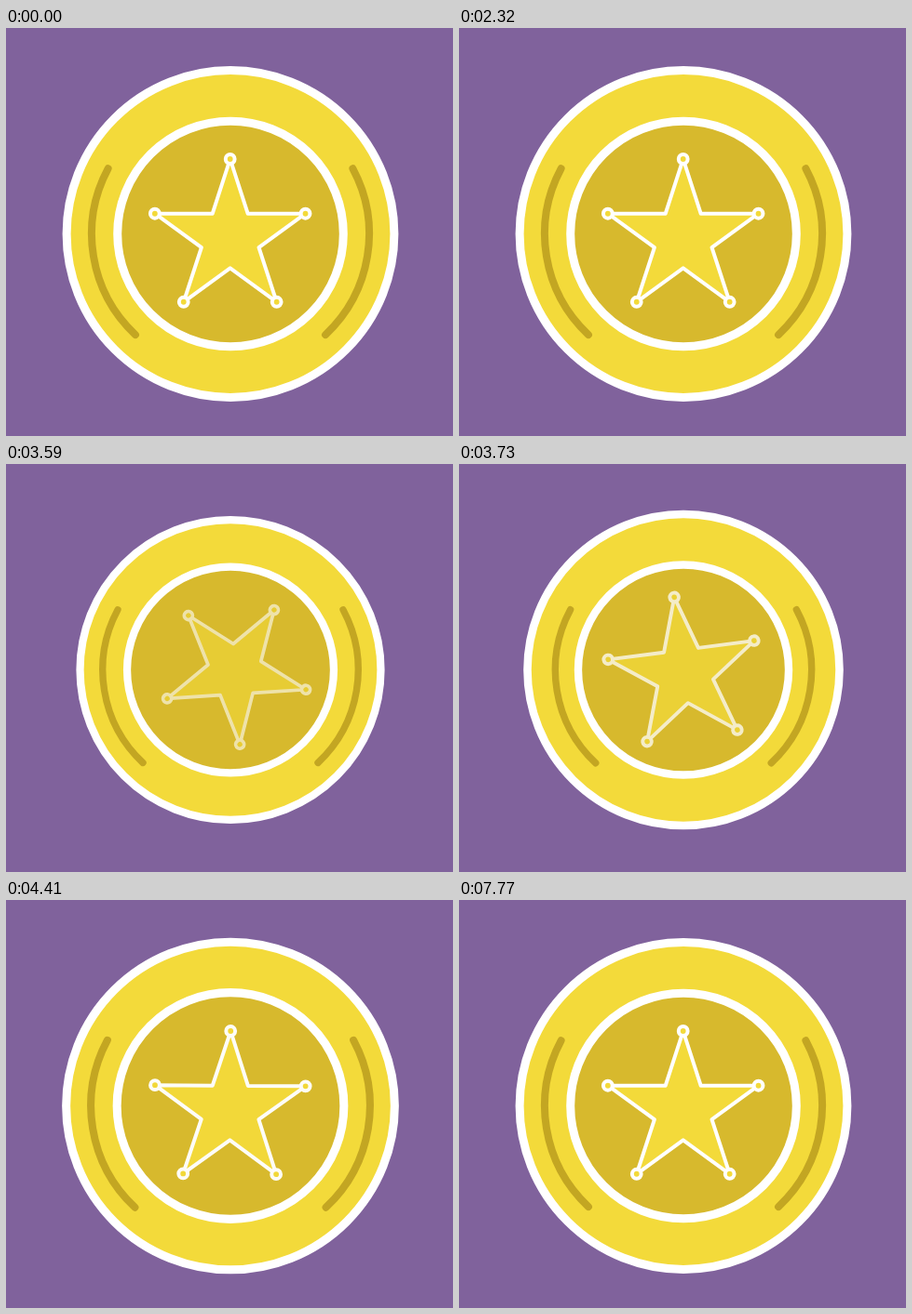
Animation, 480 px wide and 439 px high, one loop 7.81 s. Source, as an HTML page with a canvas:

```html
<!DOCTYPE html>
<html lang="en">
<head>
<meta charset="utf-8">
<title>Star badge</title>
<style>
  html, body { margin: 0; width: 100%; height: 100%; overflow: hidden; background: #80629c; }
  canvas { display: block; width: 480px; height: 439px; }
</style>
</head>
<body>
<canvas id="stage" width="480" height="439"></canvas>
<script>
const W = 480, H = 439;
const LOOP = 7810, POP = 3410;
const CX = 241, CY = 221.5;
const COLOR = { bg: '#80629c', coin: '#f3da3a', disc: '#d7b92d', arc: '#c3a622', line: '#ffffff' };
const STAR = { x: 240.7, y: 226, tip: 85, notch: 32.4, pivotY: 217 };

const ctx = document.getElementById('stage').getContext('2d');
const layer = document.createElement('canvas');
layer.width = W;
layer.height = H;
const starCtx = layer.getContext('2d');

// Damped swing around 1, shared by the coin parts with different delays.
function spring(t, delay) {
  const d = t - delay;
  return 1 - 0.213 * Math.exp(-d / 260) * Math.sin(Math.PI * d / 600);
}

function pose(time) {
  const t = time - POP;
  if (t < 0) return { coin: 1, disc: 1, arcs: 1, star: 1, turn: 0, alpha: 1 };
  return {
    coin: spring(t, -50),
    disc: spring(t, 25),
    arcs: spring(t, 60),
    star: 1 - 0.37 * Math.exp(-t / 115),
    turn: -142.5 * Math.exp(-t / 181) * Math.cos(Math.PI * t / 800) * Math.PI / 180,
    alpha: 1 - 0.71 * Math.exp(-t / 320)
  };
}

function scaled(scale, draw) {
  ctx.save();
  ctx.translate(CX, CY);
  ctx.scale(scale, scale);
  draw();
  ctx.restore();
}

function ring(radius, width, fill) {
  ctx.beginPath();
  ctx.arc(0, 0, radius, 0, Math.PI * 2);
  ctx.fillStyle = fill;
  ctx.fill();
  ctx.strokeStyle = COLOR.line;
  ctx.lineWidth = width;
  ctx.stroke();
}

function shineArcs() {
  ctx.strokeStyle = COLOR.arc;
  ctx.lineWidth = 8;
  ctx.lineCap = 'round';
  const up = Math.atan2(-70.5, 132), down = Math.atan2(108.5, 102);
  for (const side of [1, -1]) {
    ctx.save();
    ctx.scale(side, 1);
    ctx.beginPath();
    ctx.arc(0, 0, 149, up, down);
    ctx.stroke();
    ctx.restore();
  }
}

function starPoint(i) {
  const r = i % 2 ? STAR.notch : STAR.tip;
  const a = i * Math.PI / 5;
  return [r * Math.sin(a), STAR.y - STAR.pivotY - r * Math.cos(a)];
}

function drawStar(p) {
  const c = starCtx;
  c.setTransform(1, 0, 0, 1, 0, 0);
  c.clearRect(0, 0, W, H);
  c.translate(STAR.x, STAR.pivotY);
  c.rotate(p.turn);
  c.scale(p.star, p.star);
  c.fillStyle = COLOR.coin;
  c.strokeStyle = COLOR.line;
  c.lineJoin = 'round';
  c.lineWidth = 4;
  c.beginPath();
  for (let i = 0; i < 10; i++) c.lineTo(...starPoint(i));
  c.closePath();
  c.fill();
  c.stroke();
  for (let i = 0; i < 10; i += 2) {
    c.beginPath();
    c.arc(...starPoint(i), 4.9, 0, Math.PI * 2);
    c.fill();
    c.stroke();
  }
  ctx.globalAlpha = p.alpha;
  ctx.drawImage(layer, 0, 0);
  ctx.globalAlpha = 1;
}

function render(time) {
  const p = pose(time);
  ctx.fillStyle = COLOR.bg;
  ctx.fillRect(0, 0, W, H);
  scaled(p.coin, () => ring(175.9, 9, COLOR.coin));
  scaled(p.disc, () => ring(121.3, 9, COLOR.disc));
  scaled(p.arcs, shineArcs);
  drawStar(p);
}

const start = performance.now();
function tick() {
  render((performance.now() - start) % LOOP);
  requestAnimationFrame(tick);
}
tick();
</script>
</body>
</html>
```
